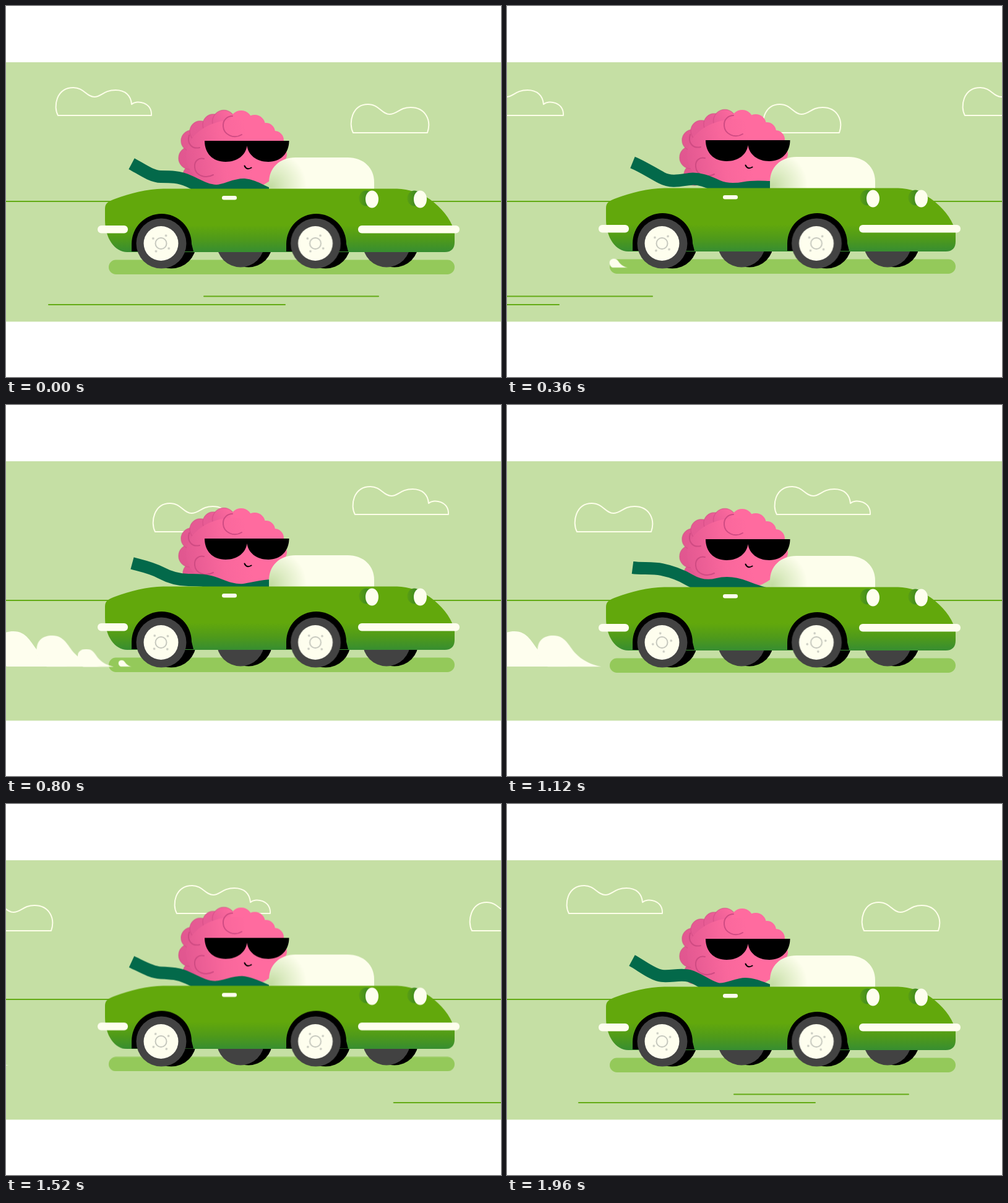
Write an HTML page without scripts that moves like this. It is 800 by 600 pixels and loops after 2000 ms.

```html
<!DOCTYPE html>
<html lang="en">
<head>
<meta charset="utf-8">
<title>Brain on a drive</title>
<style>
html, body { margin: 0; width: 100%; height: 100%; overflow: hidden; background: #fff; }
svg { display: block; width: 800px; height: 600px; }
.cream { fill: #fefeee; }
.line { fill: none; stroke: #64ab16; stroke-width: 2; stroke-linecap: round; }
.sky { fill: none; stroke: #fdfee9; stroke-width: 2; stroke-linejoin: round; animation: drift 2s steps(50) infinite; }
.road { animation: road 2s infinite; }
.bob { animation: bob 2s linear infinite; }
.spin { animation: spin 2s steps(50) infinite; }
.shine { animation: shine 2s infinite; }
.scarf { fill: none; stroke: #03694a; stroke-width: 20; animation: wave .5s linear infinite; }
.puff { animation: puff 2s infinite; }
.lump { fill: url(#lump); stroke: #cf4b83; stroke-opacity: .55; stroke-width: 1.5; }
.curl { fill: none; stroke: #cf4b83; stroke-width: 2; stroke-linecap: round; }

@keyframes drift { to { transform: translateX(-800px); } }
@keyframes spin { to { transform: rotate(1620deg); } }
@keyframes bob {
  0%, 98%, 100% { transform: none; }
  18%, 56%, 68% { transform: translateY(-1px); }
  40%, 84% { transform: translateY(-2px); }
}
@keyframes road {
  0% { transform: translateX(0); animation-timing-function: steps(4); }
  8% { transform: translateX(-179px); animation-timing-function: steps(5); }
  18% { transform: translateX(-367px); animation-timing-function: steps(5); }
  28% { transform: translateX(-530px); animation-timing-function: steps(5); }
  38% { transform: translateX(-665px); animation-timing-function: step-end; }
  68% { transform: translateX(740px); animation-timing-function: steps(8); }
  84% { transform: translateX(375.5px); animation-timing-function: steps(8); }
  100% { transform: translateX(0); }
}
@keyframes shine {
  0%, 76% { transform: translateX(-130px); animation-timing-function: steps(4); }
  84% { transform: translateX(0); animation-timing-function: steps(5); }
  94%, 100% { transform: translateX(160px); }
}
@keyframes puff {
  0% { transform: translate(200px, 423px) scale(0); animation-timing-function: step-end; }
  2% { transform: translate(187px, 423px) scale(.18); animation-timing-function: step-end; }
  4% { transform: translate(173px, 423px) scale(.25); animation-timing-function: steps(3); }
  10% { transform: translate(130px, 423px) scale(.5); animation-timing-function: steps(4); }
  18% { transform: translate(75px, 423px) scale(.88); animation-timing-function: steps(4); }
  26% { transform: translate(12px, 423px) scale(1); animation-timing-function: steps(7); }
  40%, 100% { transform: translate(-100px, 423px) scale(1); }
}
@keyframes wave {
  0%, 100% { d: path("M203 255C218 263 235 276 250 276S280 276 295 283S325 299 340 299S370 288 385 289S415 301 430 306"); }
  24% { d: path("M203 264C218 266 235 264 250 267S280 275 295 284S325 295 340 291S370 289 385 295S415 306 430 309"); }
  36% { d: path("M201 265C216 265 235 264 250 270S280 287 295 290S325 287 340 287S370 295 385 300S415 302 430 302"); }
  60% { d: path("M204 258C219 262 235 265 250 273S280 285 295 285S325 285 340 291S370 303 385 301S415 294 430 294"); }
  72% { d: path("M203 254C218 260 235 271 250 279S280 283 295 281S325 285 340 292S370 298 385 295S415 294 430 294"); }
  92% { d: path("M202 253C217 261 235 276 250 278S280 274 295 278S325 296 340 299S370 291 385 291S415 299 430 304"); }
}
</style>
</head>
<body>
<svg viewBox="0 0 800 600" xmlns="http://www.w3.org/2000/svg">
<defs>
  <linearGradient id="paint" x1="0" y1="295" x2="0" y2="397" gradientUnits="userSpaceOnUse">
    <stop offset=".58" stop-color="#62a80c"/>
    <stop offset=".8" stop-color="#4f9a1a"/>
    <stop offset="1" stop-color="#388e30"/>
  </linearGradient>
  <linearGradient id="lump" x1="280" y1="262" x2="385" y2="205" gradientUnits="userSpaceOnUse">
    <stop offset="0" stop-color="#e0568f"/>
    <stop offset=".7" stop-color="#e95d96"/>
    <stop offset="1" stop-color="#ff6b9f"/>
  </linearGradient>
  <linearGradient id="face" x1="285" y1="230" x2="390" y2="215" gradientUnits="userSpaceOnUse">
    <stop offset="0" stop-color="#e25891"/>
    <stop offset=".6" stop-color="#f9679c"/>
    <stop offset="1" stop-color="#ff6b9f"/>
  </linearGradient>
  <radialGradient id="glass" cx="428" cy="292" r="58" gradientUnits="userSpaceOnUse">
    <stop offset="0" stop-color="#c3dca2"/>
    <stop offset=".4" stop-color="#dcebc2"/>
    <stop offset="1" stop-color="#fdfeec"/>
  </radialGradient>
  <linearGradient id="lamp" x1="0" x2="1">
    <stop offset="0" stop-color="#5a9f12"/>
    <stop offset="1" stop-color="#2e7d2c"/>
  </linearGradient>
  <clipPath id="stage"><rect y="91" width="800" height="419.500"/></clipPath>
  <clipPath id="lens"><use href="#shades"/></clipPath>
  <path id="shades" d="M321 218H457.500C457.500 238 444 252 424 252C405 252 391.500 241 389.500 226C387.500 241 374 252 355 252C334 252 321 238 321 218Z"/>
  <path id="dust" class="cream" d="M-29 -30C-29 -48 -18 -57 0 -57C22 -57 28 -38 40 -25C52 -12 70 -3 88 0H-10C-22 -4 -29 -18 -29 -30Z"/>
  <g id="clouds">
    <path d="M84 177C76 163 81 132 109 132C126 132 130 147 143 147C154 147 158 136 177 136C193 136 202 145 203 159C212 151 236 156 235 177Z"/>
    <path d="M561 205C553 190 559 159 585 159C603 159 607 175 620 175C632 175 636 164 654 164C678 164 688 185 681 205Z"/>
  </g>
  <g id="far">
    <circle cx="392" cy="384" r="38.500"/>
    <circle cx="379" cy="384" r="38.500" fill="#424242"/>
  </g>
  <path id="arch" d="M203 397V385A48.500 49 0 0 1 300 385L303 397Z"/>
  <g id="wheel">
    <circle cx="251" cy="384" r="40.500" fill="#434343"/>
    <circle cx="250.500" cy="384" r="28" class="cream"/>
    <g transform="translate(250.500 384)" fill="#c6c8be">
      <circle r="9" fill="none" stroke="#c6c8be" stroke-width="2"/>
      <g class="spin">
        <circle cx="15" r="1.800"/><circle cx="-15" r="1.800"/>
        <circle cy="15" r="1.800"/><circle cy="-15" r="1.800"/>
      </g>
    </g>
  </g>
  <g id="light">
    <ellipse cx="582" cy="311" rx="11.500" ry="12.500" fill="url(#lamp)"/>
    <ellipse cx="591.500" cy="312.500" rx="10.500" ry="14" class="cream"/>
  </g>
</defs>

<g clip-path="url(#stage)">
  <rect y="91" width="800" height="420" fill="#c5dfa4"/>
  <path class="line" d="M0 316H800"/>
  <g class="sky"><use href="#clouds"/><use href="#clouds" x="800"/></g>
  <path class="line road" d="M320 469.500H602M69 483H451"/>

  <rect class="bob" x="166" y="410.500" width="559" height="23.500" rx="11.700" fill="#94c95a"/>

  <g>
    <use href="#dust" class="puff" style="animation-delay:-1720ms"/>
    <use href="#dust" class="puff" style="animation-delay:-1560ms"/>
    <use href="#dust" class="puff" style="animation-delay:-1400ms"/>
    <use href="#dust" class="puff" style="animation-delay:-1240ms"/>
  </g>

  <use href="#far"/>
  <use href="#far" x="236"/>
  <circle cx="267" cy="384" r="40.500"/>
  <circle cx="516.500" cy="384" r="40.500"/>

  <g class="bob">
    <!-- driver -->
    <g class="lump">
      <circle cx="303" cy="274" r="17"/>
      <circle cx="297" cy="246" r="18"/>
      <circle cx="300" cy="218" r="17"/>
      <circle cx="314" cy="203" r="17"/>
      <circle cx="335" cy="192" r="17"/>
      <circle cx="352" cy="187" r="18.500"/>
    </g>
    <g fill="#ff6b9f">
      <circle cx="380" cy="187" r="18"/>
      <circle cx="402" cy="193" r="17"/>
      <circle cx="420" cy="204" r="15"/>
      <circle cx="434" cy="217" r="15"/>
      <circle cx="439" cy="240" r="15"/>
    </g>
    <ellipse cx="370" cy="242" rx="79" ry="58" fill="url(#face)"/>
    <g class="curl">
      <path d="M381 208C368 216 352 208 351 195C350 184 358 178 366 178"/>
      <path d="M335 273C322 280 306 274 305 261C304 250 312 245 320 247"/>
      <path d="M296 209C292 222 300 232 313 229"/>
    </g>
    <use href="#shades"/>
    <g clip-path="url(#lens)">
      <path class="shine cream" d="M399 217H438L413 253H374ZM307 217H338L313 253H282Z"/>
    </g>
    <path d="M385.500 258.500Q389 266 396.500 261.500" fill="none" stroke="#000" stroke-width="2" stroke-linecap="round"/>
    <path class="scarf" d="M203 255C218 263 235 276 250 276S280 276 295 283S325 299 340 299S370 288 385 289S415 301 430 306"/>

    <!-- car -->
    <path d="M425 297V285C425 262 442 245 468 245H552C578 245 595 262 595 285V297Z" fill="url(#glass)"/>
    <path d="M160 328C160 319 165 316 176 312C200 303 228 296 254 295.500H632C655 296 678 306 692 318C709 332 722 350 725 368V382C725 392 720 398 709 398H196C176 398 160 376 160 346Z" fill="url(#paint)"/>
    <use href="#light"/>
    <use href="#light" x="78"/>
    <g class="cream">
      <rect x="349" y="307" width="24" height="6.500" rx="3.200"/>
      <rect x="148" y="355" width="49" height="12.500" rx="6"/>
      <rect x="569" y="355" width="164" height="12.500" rx="6"/>
    </g>
    <use href="#arch"/>
    <use href="#arch" x="250"/>
  </g>

  <use href="#wheel"/>
  <use href="#wheel" x="249.500"/>
</g>
</svg>
</body>
</html>
```
